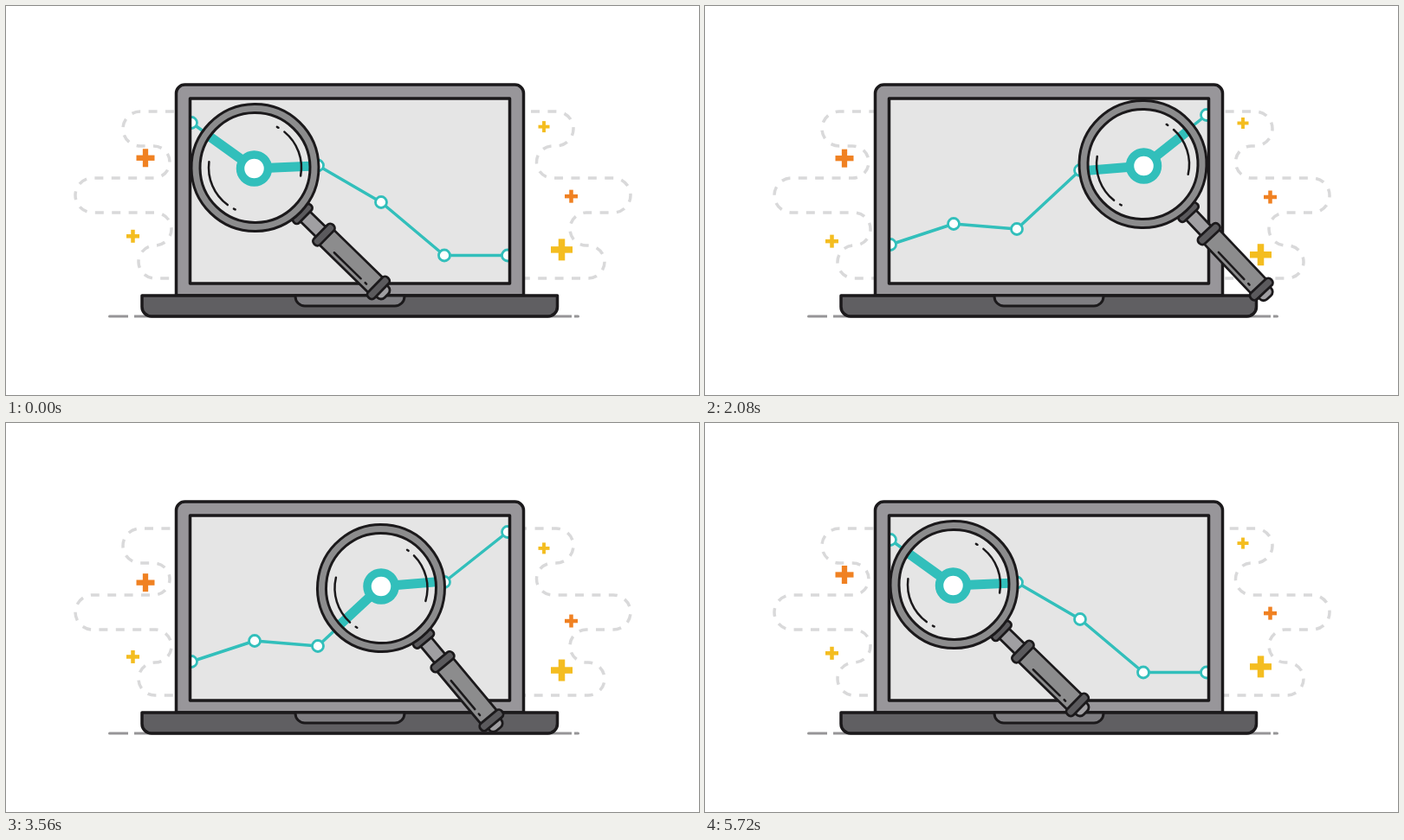
Write an HTML page with a canvas that moves like this. It is 800 px wide and 450 px high and loops after 5760 ms.

```html
<!DOCTYPE html>
<html lang="en">
<head>
<meta charset="utf-8">
<title>Chart under a magnifier</title>
<style>
html, body { margin: 0; width: 100%; height: 100%; overflow: hidden; background: #fff; }
canvas { display: block; width: 800px; height: 450px; }
</style>
</head>
<body>
<canvas id="stage" width="800" height="450"></canvas>
<script>
const ctx = document.getElementById('stage').getContext('2d');
const LOOP = 5760, FLOAT = LOOP / 2, TAU = Math.PI * 2;
const INK = '#1b191b', TEAL = '#32bfbb', GLASS = '#e5e5e5';
const STEEL = '#8c8c8d', PALE = '#a09fa2', DARK = '#5b5a5d';
const ORANGE = '#f08122', YELLOW = '#f4bd20';

const falling = [135, 187.5, 184.5, 227, 288.5, 288.5];
const rising = [276, 252, 258, 190, 184, 126];

const home = { x: 287.5, y: 187, tilt: 44.3 };
const moves = [
  { at: 240, span: 800, x: 218, y: -4, tilt: 2.3 },
  { at: 2428, span: 560, x: -72.5, y: 8, tilt: 3.6 },
  { at: 4196, span: 640, x: -145.5, y: -4, tilt: -5.9 }
];

const pluses = [
  { x: 161, y: 180.2, low: 1060, size: 21, colour: ORANGE },
  { x: 146.5, y: 271, low: 1440, size: 15, colour: YELLOW },
  { x: 621, y: 140.2, low: 760, size: 13, colour: YELLOW },
  { x: 652.5, y: 224.8, low: 1080, size: 15, colour: ORANGE },
  { x: 641.5, y: 286.6, low: 1440, size: 25, colour: YELLOW }
];

const trails = [
  'M206 122H155a20 20 0 0 0 0 40H170.5a18.5 18.5 0 0 1 0 37H100a20 20 0 0 0 0 40H172a19 19 0 0 1 0 38a19 19 0 0 0 0 38H206',
  'M594 122H635a20 20 0 0 1 0 40H631a18.5 18.5 0 0 0 0 37H701a20 20 0 0 1 0 40H670a19 19 0 0 0 0 38H672a19 19 0 0 1 0 38H594'
].map(d => new Path2D(d));

const clamp = (v, low = 0) => Math.max(low, Math.min(1, v));
const mix = (a, b, k) => a + (b - a) * k;
const ease = v => (1 - Math.cos(Math.PI * clamp(v))) / 2;

// Ease in and out with a small wind-up and overshoot.
function swing(v) {
  const pull = u => u * u * (2.4 * u - 1.4) / 2;
  v = clamp(v);
  return v < 0.5 ? pull(2 * v) : 1 - pull(2 - 2 * v);
}

function lensAt(t) {
  const lens = { ...home };
  for (const m of moves) {
    const k = swing((t - m.at) / m.span);
    for (const key in lens) lens[key] += m[key] * k;
  }
  const hop = Math.PI * clamp((t - 1200) / 580);
  lens.x += 10 * Math.sin(2 * hop);
  lens.y -= 18 * Math.sin(hop) ** 2;
  return lens;
}

// The handle trails behind the glass.
function poseAt(t) {
  const lens = lensAt(t);
  lens.tilt += 0.33 * (lens.x - lensAt(t - 120).x);
  return lens;
}

function chartAt(t) {
  return falling.map((y, i) => {
    const up = ease((t - 140 - 40 * i) / 400);
    const down = ease((t - 3760 - 40 * i) / 400);
    return [214 + 73 * i, mix(y, rising[i], up - down)];
  });
}

function paint(fill, width = 3, stroke = INK) {
  if (fill) { ctx.fillStyle = fill; ctx.fill(); }
  if (width) { ctx.lineWidth = width; ctx.strokeStyle = stroke; ctx.stroke(); }
}

function box(x, y, w, h, r, fill, width) {
  ctx.beginPath();
  ctx.roundRect(x, y, w, h, r);
  paint(fill, width);
}

// A box centred on the handle's axis.
function part(x, length, width, r, fill) {
  box(x, -width / 2, length, width, r, fill, 2.8);
}

function disc(x, y, r, fill, width, stroke) {
  ctx.beginPath();
  ctx.arc(x, y, r, 0, TAU);
  paint(fill, width, stroke);
}

function line(x1, y1, x2, y2, width, stroke) {
  ctx.beginPath();
  ctx.moveTo(x1, y1);
  ctx.lineTo(x2, y2);
  paint(null, width, stroke);
}

function glint(from, to) {
  ctx.beginPath();
  ctx.arc(0, 0, 53.5, from * TAU / 360, to * TAU / 360);
  paint(null, 2.5);
}

function clipped(shape, draw) {
  ctx.save();
  ctx.beginPath();
  shape();
  ctx.clip();
  draw();
  ctx.restore();
}

function drawChart(points, width, r, ring) {
  ctx.beginPath();
  points.forEach(p => ctx.lineTo(...p));
  paint(null, width, TEAL);
  points.forEach(([x, y]) => disc(x, y, r, '#fff', ring, TEAL));
}

function drawBackdrop(t) {
  ctx.lineCap = 'butt';
  ctx.lineWidth = 3.5;
  ctx.strokeStyle = '#d9d9da';
  ctx.setLineDash([10, 9.4]);
  ctx.lineDashOffset = -12 - 19.4 * t / FLOAT;
  trails.forEach(trail => ctx.stroke(trail));
  ctx.setLineDash([]);
  ctx.lineCap = 'round';

  for (const { x, y, low, size, colour } of pluses) {
    const wave = Math.cos(TAU * (t - low) / FLOAT);
    const mid = y + 4.7 * clamp(1.4 * wave, -1);
    const thick = size * 0.3;
    ctx.fillStyle = colour;
    ctx.fillRect(x - size / 2, mid - thick / 2, size, thick);
    ctx.fillRect(x - thick / 2, mid - size / 2, thick, size);
  }
}

function drawLaptop(points) {
  line(119.5, 359, 660.5, 359, 3, '#969597');
  for (const [x, w] of [[141, 7], [653, 3]]) {
    ctx.fillStyle = '#fff';
    ctx.fillRect(x, 356, w, 6);
  }
  const screen = [212.5, 107, 369, 214];
  const foot = [0, 0, 11, 11];
  box(196.5, 91, 401, 244, [10, 10, 0, 0], '#98969a', 3.5);
  box(...screen, 0, GLASS, 0);
  clipped(() => ctx.rect(...screen), () => drawChart(points, 3.5, 6.5, 2.8));
  box(...screen, 0, null, 3.5);
  box(157, 335, 479.5, 24, foot, '#605f62', 3.5);
  box(334, 335, 126, 12, foot, '#7f7e82', 3);
}

function drawHandle() {
  part(201, 11, 18, [0, 6, 6, 0], PALE);
  part(80, 28, 16, 0, PALE);
  part(112, 86, 24, 0, STEEL);
  line(134, 6.5, 177, 6.5, 2.5);
  line(184, 6.5, 186, 6.5, 2.5);
  part(72, 9, 28, 4, DARK);
  part(106, 10, 31, 4.5, DARK);
  part(194, 10, 32, 4.5, DARK);
}

function drawMagnifier(points, { x, y, tilt }) {
  const big = points.map(([px, py]) => [mix(x, px, 2) - x, mix(y, py, 2) - y]);
  const turn = tilt * TAU / 360;
  ctx.save();
  ctx.translate(x, y);
  ctx.rotate(turn);
  drawHandle();
  disc(0, 0, 73.5, STEEL, 3);
  disc(0, 0, 63.5, GLASS, 0);
  ctx.rotate(-turn);
  clipped(() => ctx.arc(0, 0, 63.5, 0, TAU), () => drawChart(big, 11, 16, 9.5));
  ctx.rotate(turn);
  disc(0, 0, 63.5, null, 3);
  for (const side of [82, -95]) {
    glint(side, side + 61);
    glint(side - 11, side - 9);
  }
  ctx.restore();
}

const start = performance.now();

function frame() {
  const t = (performance.now() - start) % LOOP;
  const points = chartAt(t);
  ctx.fillStyle = '#fff';
  ctx.fillRect(0, 0, 800, 450);
  ctx.lineJoin = 'round';
  drawBackdrop(t);
  drawLaptop(points);
  drawMagnifier(points, poseAt(t));
  requestAnimationFrame(frame);
}
frame();
</script>
</body>
</html>
```
